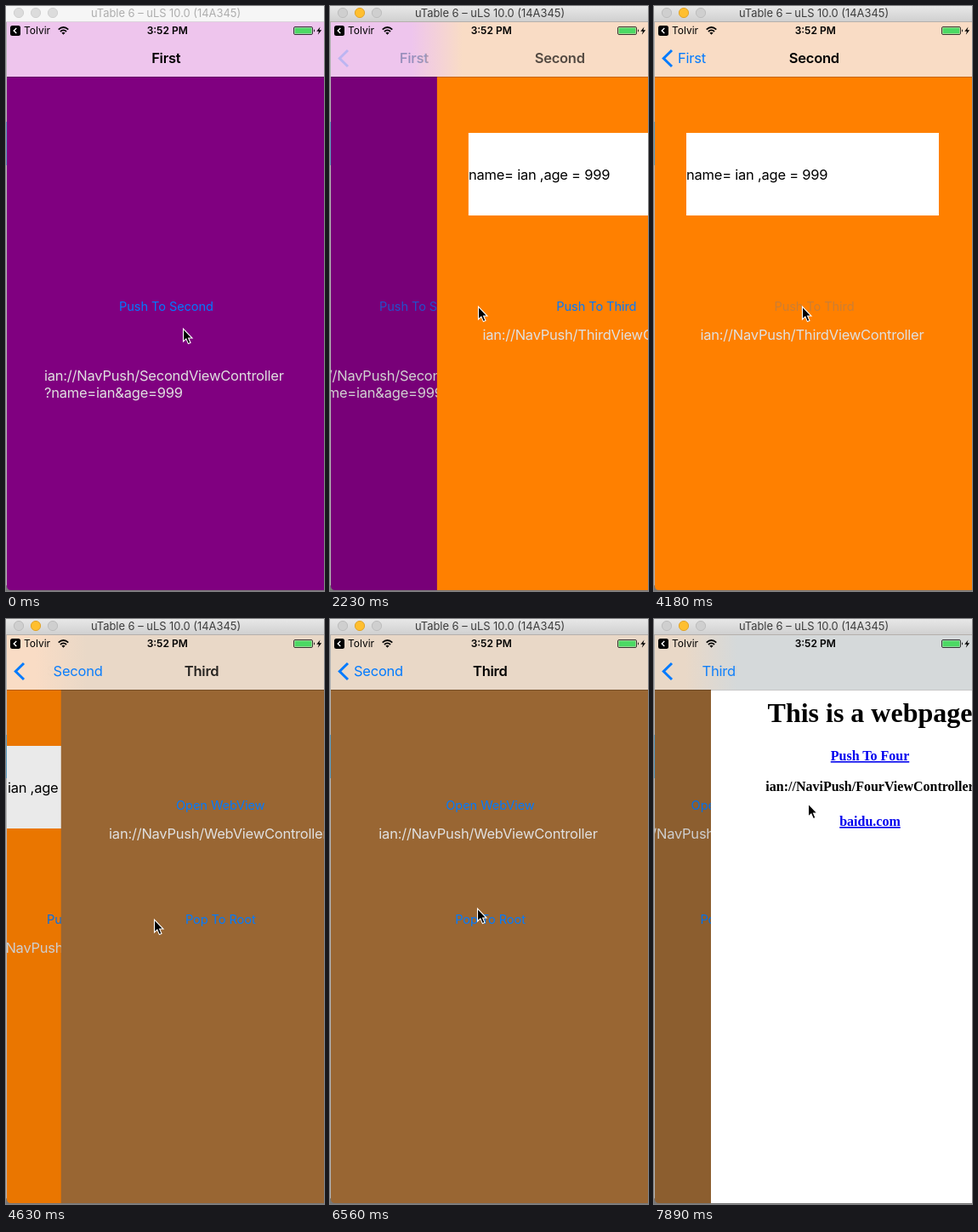
An HTML page that plays this animation: 374 by 687 pixels, repeating every 8000 ms.

```html
<!DOCTYPE html>
<html lang="en">
<head>
<meta charset="utf-8">
<title>Navigation push demo</title>
<style>
  html, body { margin: 0; width: 100%; height: 100%; overflow: hidden; background: #b4b4b4; }
  svg { display: block; width: 100vw; height: 100vh; }
  text { font-family: Inter, Roboto, sans-serif; }
  .mid { text-anchor: middle; }
  .label, .nav { font-size: 16.5px; letter-spacing: -.014em; }
  .label { fill: #e0e0e0; }
  .dark { fill: #000; }
  .title { font-weight: 600; }
  .button { font-size: 14.6px; letter-spacing: -.006em; fill: #007aff; }
  .back { fill: #007aff; }
  .status { font-size: 12px; }
  .web { font: bold 16px "Liberation Serif", serif; }
  .h1 { font-size: 32px; }
  .link { fill: #0000ee; text-decoration: underline; }
</style>
</head>
<body>
<svg viewBox="0 0 374 687" xmlns="http://www.w3.org/2000/svg">
  <defs>
    <linearGradient id="barFill" gradientUnits="userSpaceOnUse">
      <stop id="barLeft" offset="0"/><stop id="barRight" offset="1"/>
    </linearGradient>
    <linearGradient id="chrome" x2="0" y2="1">
      <stop offset="0" stop-color="#e8e8e8"/><stop offset="1" stop-color="#d0d0d0"/>
    </linearGradient>
    <clipPath id="phone"><path d="M1 18H374V686H6Q1 686 1 681Z"/></clipPath>
  </defs>

  <rect y="136" width="1" height="51" fill="#5c9cc0"/>
  <path d="M0 680V687H374V685H6Z" fill="#777"/>

  <g clip-path="url(#phone)">
    <g id="screens"></g>
    <rect y="18" width="374" height="65" fill="url(#barFill)"/>
    <rect y="83" width="374" height="1" fill="#000" opacity=".22"/>
    <g id="nav">
      <path id="chevron" d="M21 52L11.3 61.5L21 71" fill="none" stroke="#007aff" stroke-width="3"/>
      <text id="oldBack" class="nav back" y="67"/>
      <text id="newBack" class="nav back" y="67"/>
      <text id="oldTitle" class="nav title mid" y="67"/>
      <text id="newTitle" class="nav title mid" y="67"/>
    </g>

    <g id="statusBar">
      <rect x="5" y="23" width="12" height="12" rx="2.5"/>
      <path d="M12.3 26L9.2 29L12.3 32" fill="none" stroke="#fff" stroke-width="1.4"/>
      <text class="status" x="21" y="33">Tolvir</text>
      <g fill="none" stroke="#000" stroke-width="1.7">
        <path d="M61.7 27.6Q67.5 22.4 73.3 27.6"/>
        <path d="M63.9 30Q67.5 26.8 71.1 30"/>
      </g>
      <path d="M65.4 31.5Q67.5 29.8 69.6 31.5L67.5 33.8Z"/>
      <text class="status title mid" x="189.7" y="33">3:52 PM</text>
      <rect x="338.5" y="24.5" width="22" height="9" rx="1.5" fill="none" stroke="#000" stroke-opacity=".75"/>
      <rect x="339.5" y="25.5" width="20" height="7" fill="#4cd964"/>
      <path d="M362 27.3Q364 29 362 30.7Z"/>
      <path d="M369.5 24.5L365.3 29.8H368L366.8 33.8L371.2 28.2H368.4Z"/>
    </g>
  </g>

  <g id="titleBar">
    <rect id="chromeRect" width="374" height="18"/>
    <rect id="chromeLine" y="18" width="374" height="1"/>
    <circle class="light" cx="15" cy="8" r="5.6"/>
    <circle class="light" cx="35" cy="8" r="5.6"/>
    <circle class="light" cx="55" cy="8" r="5.6"/>
    <text id="windowTitle" class="mid" x="188" y="12.8" font-size="12.9">uTable 6 – uLS 10.0 (14A345)</text>
  </g>

  <path id="cursor" d="M0 0V15L3.4 11.9L5.9 17.6L8.5 16.5L6.1 11H10.5Z" stroke="#fff" stroke-width="1.1"/>
</svg>

<script>
const LOOP = 8000, WIDTH = 375;
const $ = id => document.getElementById(id);
const clamp = v => Math.max(0, Math.min(1, v));

const text = (cls, x, y, s) => `<text class="${cls}" x="${x}" y="${y}">${s}</text>`;
const button = (y, s) => text('button mid', 188.5, y, s);
const label = (y, s) => text('label mid', 186, y, s);
const web = (cls, y, s) => text('web mid ' + cls, 188, y, s);

const pages = [
  { title: 'First', fill: '#800080', bar: '#eec5ed', body:
    button(358, 'Push To Second') +
    text('label', 45, 439.5, 'ian://NavPush/SecondViewController') +
    text('label', 45, 459.5, '?name=ian&amp;age=999') },
  { title: 'Second', fill: '#ff8000', bar: '#f9dcc5', body:
    button(358, 'Push To Third') + label(391.5, 'ian://NavPush/ThirdViewController') +
    '<rect x="38" y="149" width="297" height="97" fill="#fff"/>' +
    text('label dark', 38, 203.5, 'name= ian ,age = 999') },
  { title: 'Third', fill: '#996633', bar: '#e9d8c7', body:
    button(224, 'Open WebView') + label(257.5, 'ian://NavPush/WebViewController') +
    button(358, 'Pop To Root') },
  { title: '', fill: '#fff', bar: '#d5d9da', body:
    web('h1', 121, 'This is a webpage') + web('link', 166, 'Push To Four') +
    web('', 202, 'ian://NaviPush/FourViewController') + web('link', 243, 'baidu.com') }
];

$('screens').innerHTML = pages.map(p =>
  `<g><rect x="1" y="18" width="375" height="669" fill="${p.fill}"/>${p.body}` +
  '<rect class="shade" x="1" y="18" width="375" height="669" opacity="0"/></g>').join('');
const screens = [...$('screens').children];
const shades = screens.map(s => s.querySelector('.shade'));
const mainButtons = screens.map(s => s.querySelector('.button'));
const lights = [...document.querySelectorAll('.light')];

// Whole part: current page; fraction: progress of the push to the next one.
const depthSteps = [
  [0, 0], [2080, .02], [2230, .667], [2380, .93], [2530, .99], [2680, 1],
  [4480, 1.25], [4628, 1.83], [4775, 1.97], [4923, 1.995], [5070, 2],
  [7740, 2.25], [7890, 2.824]
];
const cursorSteps = [
  [0, 208, 379], [150, 205, 392], [300, 190, 402], [450, 168, 402], [590, 150, 396],
  [740, 148, 378], [880, 160, 362], [1030, 174, 353],
  [6560, 173, 340], [6710, 174, 300], [6855, 176, 255], [7000, 179, 228], [7150, 181, 217]
];
// Time, page, opacity of its main button.
const pressSteps = [
  [0, 0, 1], [1930, 0, .2], [2080, 0, .3], [2230, 0, .7], [2380, 0, 1],
  [4180, 1, .2], [4480, 1, .5], [4628, 1, 1], [7600, 2, .2], [7740, 2, .5], [7890, 2, 1]
];
const at = (steps, t) => steps.findLast(s => s[0] <= t);

function put(id, page, x, opacity) {
  const el = $(id);
  el.textContent = page ? page.title : '';
  el.setAttribute('x', x);
  el.setAttribute('opacity', clamp(opacity));
}

function drawNav(i, p) {
  const fadeIn = clamp((p - .62) / .22);
  put('oldBack', pages[i - 1], 28 - 60 * p, 1 - 2 * p);
  put('newBack', pages[i], 28 + 162 * (1 - p), fadeIn);
  put('oldTitle', pages[i], 188.3 - 134 * p, 1 - 1.2 * p);
  put('newTitle', pages[i + 1], 188.3 + 246 * (1 - p), p);
  $('chevron').setAttribute('opacity', i ? 1 : fadeIn);

  const edge = 1 + WIDTH * (1 - p);
  $('barFill').setAttribute('x1', edge - 30);
  $('barFill').setAttribute('x2', edge + 30);
  $('barLeft').setAttribute('stop-color', pages[i].bar);
  $('barRight').setAttribute('stop-color', pages[p ? i + 1 : i].bar);
}

function drawScreens(i, p) {
  screens.forEach((screen, k) => {
    const shown = k === i || (p > 0 && k === i + 1);
    const x = k === i ? -.3 * WIDTH * p : WIDTH * (1 - p);
    screen.setAttribute('display', shown ? 'inline' : 'none');
    screen.setAttribute('transform', `translate(${x})`);
    shades[k].setAttribute('opacity', k === i ? .1 * p : 0);
  });
}

function drawTitleBar(active) {
  $('chromeRect').setAttribute('fill', active ? 'url(#chrome)' : '#f6f6f6');
  $('chromeLine').setAttribute('fill', active ? '#b5b0ac' : '#dcd2dc');
  $('windowTitle').setAttribute('fill', active ? '#3c3c3c' : '#adadad');
  lights.forEach((light, k) => {
    const yellow = active && k === 1;
    light.setAttribute('fill', yellow ? '#ffbf2f' : active ? '#cfcfcf' : '#dcdcdc');
    light.setAttribute('stroke', yellow ? '#e0a32a' : active ? '#bdbdbd' : '#d0d0d0');
  });
}

function render(t) {
  const depth = at(depthSteps, t)[1], i = Math.floor(depth), p = depth - i;
  drawScreens(i, p);
  drawNav(i, p);
  drawTitleBar(t >= 1930);
  const [, page, opacity] = at(pressSteps, t);
  mainButtons.forEach((b, k) => b && b.setAttribute('opacity', k === page ? opacity : 1));
  const [, x, y] = at(cursorSteps, t);
  $('cursor').setAttribute('transform', `translate(${x + .5} ${y})`);
}

const start = performance.now();
function tick() {
  render((performance.now() - start) % LOOP);
  requestAnimationFrame(tick);
}
tick();
</script>
</body>
</html>
```
